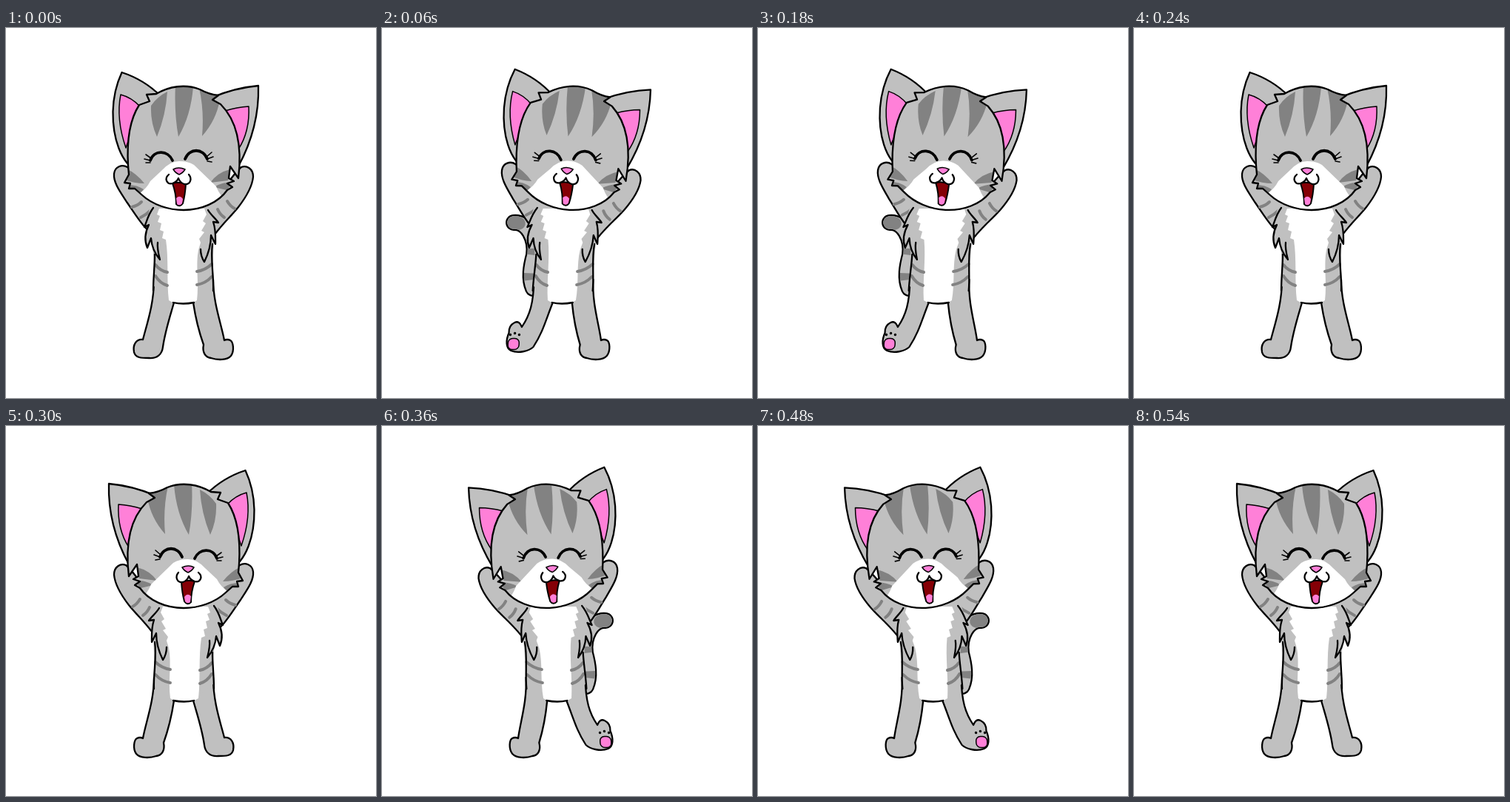
An HTML page for the animation above (0.6 s loop, 500 by 500 pixels).

```html
<!DOCTYPE html>
<html lang="en">
<head>
<meta charset="utf-8">
<title>Dancing kitten</title>
<style>
  html, body { margin: 0; width: 100%; height: 100%; overflow: hidden; background: #fff; }
  svg { display: block; width: 100vw; height: 100vh; }
  .ink { fill: none; stroke: #000; stroke-width: 2.3; stroke-linejoin: round; stroke-linecap: round; }
  .fur { fill: #c0c0c0; stroke: #000; stroke-width: 2.3; stroke-linejoin: round; stroke-linecap: round; }
  .plain { fill: #c0c0c0; }
  .dark { fill: #828282; }
  .band { fill: none; stroke: #828282; stroke-width: 4; stroke-linecap: round; }
  .white { fill: #fff; }
  .pink { fill: #ff80d8; stroke: #000; stroke-width: 1.5; stroke-linejoin: round; }
  .tail { fill: none; stroke-linecap: round; }
  .butt { stroke-linecap: butt; }
  .eye { stroke-width: 3.8; }
  .lash { stroke-width: 1.6; }
  .toes { stroke-width: 3.4; }
</style>
</head>
<body>
<svg viewBox="0 0 500 500">
  <defs>
    <path id="tailLine" d="M204 352C198 338 201 322 205 307C208 285 196 261 178 263"/>
    <path id="skull" d="M203 89L190 90L194 99L180 104C167 124 163 152 165 186L166 198L160 209L168 210L166 217L174 217L183 225C198 239 220 246 240 246C264 246 287 236 299 219L306 215L299 210L308 207L301 203L303 187L314 203C318 170 317 130 290 103L279 97L287 91Q275 90 262 83C242 75 220 79 203 89"/>
    <clipPath id="headClip"><use href="#skull"/></clipPath>
  </defs>

  <g id="cat">
    <g id="tail">
      <use href="#tailLine" class="tail" stroke="#000" stroke-width="22"/>
      <use href="#tailLine" class="tail" stroke="#c0c0c0" stroke-width="17.5"/>
      <use href="#tailLine" class="tail butt" stroke="#828282" stroke-width="17.5" stroke-dasharray="0 12 9 25 9 100"/>
      <path class="tail" stroke="#828282" stroke-width="17.5" d="M178 263Q182 262 185 264"/>
    </g>

    <g id="legs">
      <path id="stand" class="fur" d="M200 340C200 372 191 398 185 421C176 420 171 428 173 438C175 446 183 446 193 446C204 447 211 441 212 431C215 410 221 392 227 371L230 340"/>
      <g id="lifted">
        <path id="liftLeg" class="fur"/>
        <g id="sole">
          <rect class="pink" x="169.5" y="419.5" width="15" height="15" rx="6"/>
          <path class="ink toes" d="M172 414.5h.1M178 412.5h.1M184 414.5h.1"/>
        </g>
      </g>
      <path class="fur" d="M250 340L253 371C257 398 262 414 267 428C265 438 269 445 277 446C286 449 299 449 304 443C309 436 307 424 303 422Q299 420 295 422C291 400 280 372 280 340"/>
    </g>

    <g id="arms">
      <path class="fur" d="M205 282C188 276 174 250 163 235C154 221 145 209 146 197C147 187 157 184 164 188C171 194 178 204 190 220L215 240"/>
      <path class="fur" d="M275 290C283 274 302 257 314 242C324 229 333 213 334 201C334 190 325 185 318 188C309 195 300 210 290 222L265 240"/>
      <path class="band" d="M170 242Q178 240 183 235M182 256Q190 252 196 246M299 234Q303 241 309 244M286 245Q289 252 295 256"/>
    </g>

    <g id="torso">
      <path class="plain" d="M196 235L274 235L283 262C280 290 279 320 281 348L254 372L227 372L199 348C201 320 201 300 190 262Z"/>
      <path class="fur" d="M199 243C192 252 190 262 187 269L193 266C186 280 188 290 191 297L196 284C197 297 202 306 208 313C206 305 204 298 205 290M273 246C277 253 284 258 287 263L280 262C284 274 283 284 283 292L277 280C277 296 273 306 268 316C264 310 263 305 263 299"/>
      <path class="white" d="M207 244L204 252L208 254L205 262L210 264L208 273L213 275L211 284L216 286C220 312 217 342 220 368Q227 373 239 372Q252 373 258 368C261 344 256 320 260 300L263 290L261 285L268 276L264 274L270 264L266 261L271 252L268 244Z"/>
      <path class="band" d="M202 320Q208 328 218 330M202 335Q208 345 218 348M258 329Q270 327 278 319M258 347Q270 345 278 336"/>
      <path class="ink" d="M201 306C201 322 199 338 199 355M279 292C276 312 281 334 280 355M226 371Q239 374 254 371"/>
    </g>

    <g id="head">
      <path class="fur" d="M180 195C154 184 144 146 144.500 113C145 92 150 74 156.500 60C175 66 194 77 209 92"/>
      <path class="pink" d="M155 90Q170 94 181 106L162 162C153 136 151 110 155 90Z"/>
      <path class="fur" d="M278 94C297 86 318 80 341 78C342 112 334 150 314 187"/>
      <path class="pink" d="M328 106Q312 107 296 112L314 164C325 147 329 126 328 106Z"/>

      <use href="#skull" class="plain"/>
      <g clip-path="url(#headClip)">
        <path class="dark" d="M196 105Q204 93 218 86Q216 118 204 147Q195 128 196 105ZM229 76Q240 76 253 79Q250 118 233 147Q227 114 229 76ZM261 81Q279 86 289 97Q284 125 265 146Q268 112 261 81Z"/>
        <path class="dark" d="M162 190Q176 196 187 210Q173 210 160 205ZM162 212Q176 211 186 218L180 225ZM276 209Q286 195 303 191L300 206ZM281 215Q292 208 308 208L298 219Z"/>
        <path class="white" d="M180 224Q190 217 195 207L211 192Q222 180 234 180Q246 180 254 185L284 214Q286 220 292 228L280 250L200 250Z"/>
      </g>
      <use href="#skull" class="ink"/>

      <path class="ink eye" d="M195 179C200 164 219 165 225 179M242 177C248 162 266 162 272 177"/>
      <path class="ink lash" d="M196 176L189 171M195 179L187 177M195 182L189 182M271 174L278 168M272 177L280 174M272 180L278 181"/>

      <path d="M225 210Q234 207 243 211Q242 226 239 237Q235 243 230 238Q230 224 225 210Z" fill="#850006" stroke="#000" stroke-width="2"/>
      <path d="M230 230Q235 225 239 231L238 237Q235 241 231 238Z" fill="#ff80d8"/>
      <path class="white" d="M220 198C213 204 218 212 225 210Q231 208 233 204Q235 209 241 211C249 212 252 204 247 198L234 194Z"/>
      <path class="ink" d="M220 198C213 204 218 212 225 210Q231 208 233 203Q235 209 241 211C249 212 252 204 247 198"/>
      <path class="pink" d="M226 191Q233 187 242 191Q239 196 234 198Q229 196 226 191Z"/>
    </g>
  </g>
</svg>

<script>
  const STEP = 60;
  const $ = id => document.getElementById(id);

  // tilt in degrees, lift 0 = both feet down, flip = mirrored
  const centre = { tilt: 0, lift: 0 };
  const sway = { tilt: 3, lift: 1 };
  const right = [centre, sway, { tilt: 4.2, lift: 1.5 }, sway, centre];
  const left = [centre, sway, { tilt: 5.2, lift: 1.5 }, sway, centre];
  const poses = [...right, ...left.map(p => ({ ...p, flip: true }))];

  function liftLeg(dx, dy) {
    const p = (x, y) => `${x + dx} ${y + dy}`;
    return `M200 340C201 372 197 388 ${p(187, 404)}` +
      `Q${p(183, 395)} ${p(177, 398)}Q${p(169, 402)} ${p(170, 412)}` +
      `C${p(166, 422)} ${p(167, 433)} ${p(174, 436)}` +
      `C${p(184, 440)} ${p(198, 437)} ${p(204, 431)}` +
      `C${p(216, 411)} 219 394 227 371L230 340`;
  }

  function show({ tilt, lift, flip }) {
    const set = (id, value) => $(id).setAttribute("transform", value);
    const k = tilt * 0.0183;
    const lean = `matrix(1 0 ${-k} 1 ${440 * k} 0)`;
    const extra = Math.max(0, lift - 1);
    const dx = -8 * extra, dy = -12 * extra;

    set("cat", flip ? "translate(480 0) scale(-1 1)" : "");
    for (const id of ["head", "arms"]) set(id, `rotate(${tilt} 250 500)`);
    for (const id of ["legs", "torso"]) set(id, lean);
    set("tail", `rotate(${-12 * extra} 203 352)`);
    set("sole", `translate(${dx} ${dy})`);
    $("liftLeg").setAttribute("d", liftLeg(dx, dy));
    $("tail").style.display = $("lifted").style.display = lift ? "" : "none";
    $("stand").style.display = lift ? "none" : "";
  }

  let shown = -1;
  function tick() {
    const i = Math.floor(performance.now() / STEP) % poses.length;
    if (i !== shown) show(poses[shown = i]);
    requestAnimationFrame(tick);
  }
  tick();
</script>
</body>
</html>
```
